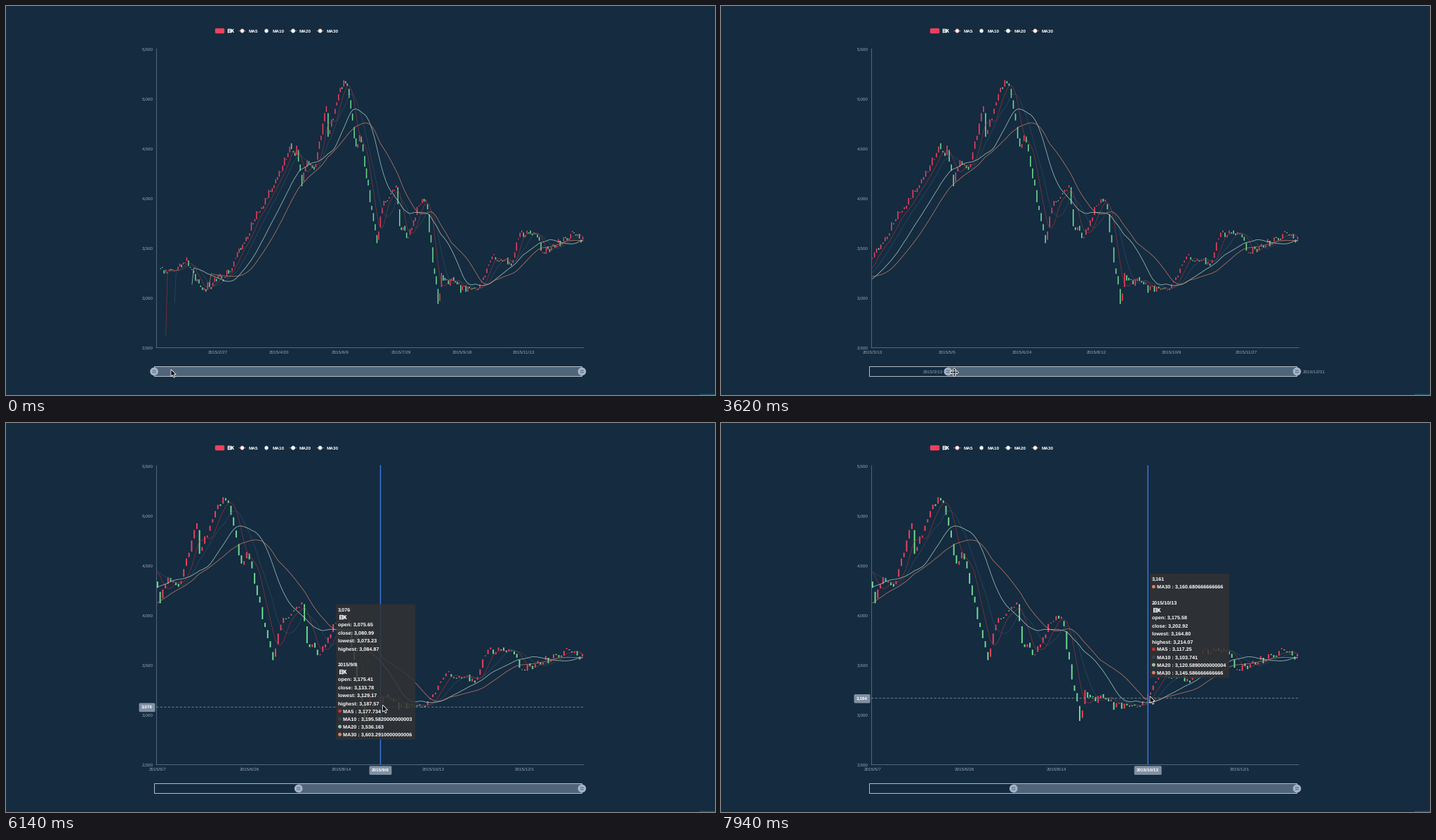
A matplotlib script for the animation above (8 s loop, 1010 px wide and 555 px high).

```python
import numpy as np
import matplotlib.pyplot as plt
from matplotlib.animation import FuncAnimation
from matplotlib.collections import LineCollection
from matplotlib.patches import Circle, FancyBboxPatch, Polygon, Rectangle

W, H, DPI = 1010, 555, 100
PX = 72 / DPI
LOOP, STEP = 8000, 40
LEFT, RIGHT, TOP, BOTTOM = 214, 823, 61, 487
BAR_LEFT, BAR_RIGHT, BAR_Y = 211, 820, 521.5
LABEL_EVERY = 35
ROW = 11.15

BG, MUTED, AXIS = "#142b40", "#9aa8b7", "#5b6e82"
UP, DOWN = "#ee405c", "#6fdc8e"
BADGE, HANDLE = "#8191a4", "#a5b4c6"
AVERAGES = {5: ("#c23531", 0.6), 10: ("#3a5468", 0.6),
            20: ("#b4d6c6", 0.8), 30: ("#d48265", 0.8)}
DOTS = ["#c23531", "#2f4554", "#91c7ae", "#d48265"]

# Main turning points of the price: (trading day, price)
TURNS = [
    (1, 3330), (9, 3240), (17, 3370), (26, 3080), (41, 3260), (52, 3640),
    (70, 4240), (76, 4480), (80, 4470), (83, 4130), (86, 4380), (90, 4290),
    (97, 4930), (98, 4630), (105, 5110), (109, 5160), (114, 4500), (116, 4650),
    (126, 3540), (129, 3930), (137, 4110), (139, 3720), (144, 3630), (149, 3900),
    (154, 3990), (161, 2930), (163, 3190), (183, 3070), (193, 3400), (203, 3330),
    (207, 3640), (219, 3630), (221, 3440), (238, 3640), (244, 3560),
]

# Motion tracks: time followed by the values at that time
HOVER = [(120, 235, 518.5), (680, 211, 523), (1180, 211, 523), (1560, 249, 522),
         (2840, 249, 522), (2960, 225, 519)]
ZOOM = [(2960, 0), (3600, 45), (3760, 45), (4360, 74), (4500, 74), (4640, 82.4)]
POINTER = [(4710, 419, 529), (5280, 496, 413), (5480, 496, 413),
           (6760, 571, 397.5), (7920, 608, 392.7)]
TIP_OFFSET = [(5280, 2, -30), (6760, -113, 105), (7920, 3, -29)]
DRAG_ON, DRAG_OFF, DATES_ON = 2960, 4710, 2000


def track(keys, t):
    times, *values = zip(*keys)
    return [float(np.interp(t, times, v)) for v in values]


def trading_dates():
    breaks = [("2015-01-01", 2), ("2015-02-18", 7), ("2015-04-06", 1),
              ("2015-05-01", 1), ("2015-06-22", 1), ("2015-09-03", 2),
              ("2015-10-01", 7)]
    closed = [np.datetime64(day) + k for day, count in breaks for k in range(count)]
    days = np.arange("2014-12-31", "2016-01-01", dtype="datetime64[D]")
    days = days[np.is_busday(days, holidays=closed)].astype(object)
    return [""] + [f"{d.year}/{d.month}/{d.day}" for d in days[1:]]


def market(count):
    rng = np.random.default_rng(8)
    close = np.interp(np.arange(count), *zip(*TURNS)) + rng.normal(0, 24, count)
    before = np.roll(close, 1)
    opening = before + 0.25 * (close - before) + rng.normal(0, 12, count)
    opening[:2] = 0
    spread = np.abs(rng.normal(0, 22, (2, count)))
    low = np.minimum(opening, close) - spread[0]
    high = np.maximum(opening, close) + spread[1]
    return np.round([opening, close, low, high], 2)


def moving_average(values, n):
    result = np.convolve(values, np.ones(n) / n)[:len(values)]
    result[:n] = np.nan
    return result


def to_y(price):
    return BOTTOM - (np.asarray(price) - 2500) * (BOTTOM - TOP) / 3000


def to_price(y):
    return 2500 + (BOTTOM - y) * 3000 / (BOTTOM - TOP)


def nearest(values, price):
    return int(np.nanargmin(np.abs(values - price)))


DATES = trading_dates()
N = len(DATES)
QUOTES = market(N)
OPEN, CLOSE = QUOTES[:2]
MEANS = {n: moving_average(OPEN, n) for n in AVERAGES}

LATIN, CJK = "Liberation Sans", "Noto Sans CJK JP"
plt.rcParams.update({"font.family": LATIN, "path.snap": False, "text.hinting": "none"})
fig = plt.figure(figsize=(W / 100, H / 100), dpi=DPI, facecolor=BG)
ax = fig.add_axes([0, 0, 1, 1])
ax.set(xlim=(0, W), ylim=(H, 0))
ax.axis("off")


def text(x, y, s="", size=6.4, color=MUTED, **kw):
    kw.setdefault("va", "baseline")
    offset = 0.36 * size if kw["va"] == "baseline" else 0
    return ax.text(x, y + offset, s, fontsize=size * PX, color=color, **kw)


def line(xs, ys, color, width=1.0, **kw):
    return ax.plot(xs, ys, color=color, lw=width * PX, **kw)[0]


def add(patch):
    return ax.add_patch(patch)


def draw_legend():
    add(FancyBboxPatch((299.5, 33.5), 10, 4, boxstyle="round,pad=1.7", fc=UP, ec="none"))
    text(314, 35.5, "日K", color="white", weight="bold", family=CJK)
    edges = ["#e58f8b", "#7f97a8", "#b4d6c6", "#e0a288"]
    for x, n, edge in zip((336.5, 371, 409, 447.5), AVERAGES, edges):
        if n != 10:
            line([x - 4.8, x + 4.8], [35.5, 35.5], edge, 0.8, alpha=0.8)
        add(Circle((x, 35.5), 2.7, fc="white", ec=edge, lw=0.6 * PX, zorder=3))
        text(x + 9, 35.5, f"MA{n}", color="white", weight="bold")


def draw_axes():
    line([LEFT + 0.5] * 2, [TOP, BOTTOM], AXIS, 0.9)
    line([LEFT, RIGHT], [BOTTOM + 0.5] * 2, AXIS, 0.9)
    for price in range(2500, 5501, 500):
        text(210, to_y(price), f"{price:,}", ha="right")


class Handle:
    def __init__(self):
        self.disc = add(Circle((0, BAR_Y), 5.8, fc=HANDLE, ec="none", zorder=7))
        self.bars = [line([], [], "#40566b", 0.9, zorder=8) for _ in range(2)]

    def move(self, x):
        self.disc.center = (x, BAR_Y)
        for bar, dy in zip(self.bars, (-1.4, 1.4)):
            bar.set_data([x - 2.1, x + 2.1], [BAR_Y + dy] * 2)


def cursor_shapes():
    arrow = [(0, 0), (0, 10), (2.3, 7.9), (3.9, 11.6), (5.6, 10.9), (4, 7.3), (7.2, 7.2)]
    arm = np.array([(-.9, -.9), (-.9, -3.3), (-2.4, -3.3), (0, -6), (2.4, -3.3), (.9, -3.3)])
    quarter = np.array([(0, 1), (-1, 0)])
    cross = np.vstack([arm @ np.linalg.matrix_power(quarter, k) for k in range(4)])
    half = np.array([(3, -1), (3, -3), (6, 0), (3, 3), (3, 1)])
    return {"arrow": np.array(arrow), "move": cross, "resize": np.vstack([half, -half])}


def cursor_state(t, zoom):
    if t < DRAG_ON:
        return ("arrow" if t < 1560 else "move"), track(HOVER, t)
    if t < DRAG_OFF:
        kind = "move" if t < 4000 else "resize"
        return kind, [225 + 2.385 * zoom, 519 + 0.08 * zoom]
    x, y = track(POINTER, t)
    return "arrow", [x + 3, y - 3]


draw_legend()
draw_axes()
add(Rectangle((988, 553.6), 22, 1.4, fc="#1d5365", ec="none"))

candles = {color: ax.add_collection(LineCollection([], colors=color, zorder=2))
           for color in (UP, DOWN)}
mean_lines = {n: line([], [], color, 0.85, alpha=alpha, zorder=3)
              for n, (color, alpha) in AVERAGES.items()}
day_labels = [text(0, 494, ha="center") for _ in range(N // LABEL_EVERY)]

selection = add(Rectangle((BAR_LEFT, 514.5), 1, 14, fc="#50657a", ec="none", zorder=4))
add(Rectangle((BAR_LEFT + 0.5, 514.5), BAR_RIGHT - BAR_LEFT, 14, fill=False,
              ec="#c3ccd5", lw=0.9 * PX, zorder=5))
start_handle, end_handle = Handle(), Handle()
end_handle.move(820.5)
start_date = text(0, BAR_Y, ha="right", zorder=7)
end_date = text(828.5, BAR_Y, DATES[-1], zorder=7)

badge = dict(color="white", weight="bold", ha="center", va="center_baseline", zorder=9,
             bbox=dict(boxstyle="round,pad=0.55,rounding_size=0.25", fc=BADGE, ec="none"))
v_line = line([0, 0], [TOP, BOTTOM], "#3a74d8", 1.5, zorder=6)
h_line = line([LEFT, RIGHT], [0, 0], "#8796a6", 0.8, zorder=6, dashes=(4, 3))
x_badge = text(0, 495, **badge)
y_badge = text(201, 0, **badge)
tip_box = add(Rectangle((0, 0), 113, 10, fc="#323232", alpha=0.84, ec="none", zorder=10))
tip_rows = [text(0, 0, size=7.3, color="white", weight="bold", zorder=11) for _ in range(17)]
tip_dots = [add(Circle((0, 0), 2.5, ec="none", zorder=11)) for _ in range(5)]
pointer_parts = [v_line, h_line, x_badge, y_badge, tip_box, *tip_rows, *tip_dots]

SHAPES = cursor_shapes()
cursor = add(Polygon(SHAPES["arrow"], fc="black", ec="white", lw=0.8 * PX, zorder=20))


def draw_market(start):
    width = (RIGHT - LEFT) / (N - start)
    days = np.arange(start, N)
    xs = LEFT + (days - start + 0.5) * width
    y1, y2 = to_y(OPEN[days]), to_y(CLOSE[days])
    top, base = np.minimum(y1, y2), np.maximum(y1, y2)
    base = np.maximum(base, top + 1.2)
    rising = CLOSE[days] >= OPEN[days]
    for color, chosen in ((UP, rising), (DOWN, ~rising)):
        chosen = chosen & (days > 1)
        candles[color].set_segments([[(x, a), (x, b)] for x, a, b in
                                     zip(xs[chosen], top[chosen], base[chosen])])
        candles[color].set_linewidth(max(1.5, 0.52 * width) * PX)
    for n, curve in mean_lines.items():
        curve.set_data(xs, to_y(MEANS[n][days]))
    for k, label in enumerate(day_labels):
        day = start + k * LABEL_EVERY
        label.set_visible(day < N)
        if day < N:
            label.set_text(DATES[day])
            label.set_x(LEFT + (k * LABEL_EVERY + 0.5) * width)
    return width


def quote_rows(day):
    names = ("open", "close", "lowest", "highest")
    return [("日K", None)] + [(f"{n}: {v:,.2f}", None) for n, v in zip(names, QUOTES[:, day])]


def mean_row(k, day):
    n = list(AVERAGES)[k]
    return f"MA{n} : {float(MEANS[n][day]):,}", DOTS[k]


def tooltip_rows(day, price):
    if abs(MEANS[30][day] - price) < 60:
        near = nearest(MEANS[30], price)
        value, rows = MEANS[30][near], [mean_row(3, near)]
    else:
        near = nearest(OPEN, price)
        value, rows = OPEN[near], quote_rows(near)
    rows = [(f"{value:,.0f}", None)] + rows + [("", None), (DATES[day], None)]
    return rows + quote_rows(day) + [mean_row(k, day) for k in range(4)]


def draw_tooltip(x, bottom, rows):
    height = 15 + ROW * (len(rows) - 1)
    y = bottom - height
    tip_box.set_xy((x, y))
    tip_box.set_height(height)
    for unused in tip_rows[len(rows):]:
        unused.set_visible(False)
    dots = iter(tip_dots)
    for k, (item, (words, color)) in enumerate(zip(tip_rows, rows)):
        row_y = y + 7.5 + ROW * k
        item.set_text(words)
        item.set_fontfamily(CJK if words == "日K" else LATIN)
        item.set_position((x + (10 if color else 2.8), row_y + 2.6))
        if color:
            dot = next(dots)
            dot.center = (x + 5.3, row_y)
            dot.set_facecolor(color)
    for unused in dots:
        unused.set_visible(False)


def draw_pointer(t, start, width):
    x, y = track(POINTER, t)
    shown = y <= BOTTOM
    for part in pointer_parts:
        part.set_visible(shown)
    if not shown:
        return
    cell = int((x - LEFT) / width)
    day, price = start + cell, to_price(y)
    center = LEFT + (cell + 0.5) * width
    v_line.set_xdata([center] * 2)
    h_line.set_ydata([y] * 2)
    x_badge.set_text(DATES[day])
    x_badge.set_x(center)
    y_badge.set_text(f"{price:,.0f}")
    y_badge.set_y(y)
    dx, dy = track(TIP_OFFSET, t)
    draw_tooltip(x + dx, y + dy, tooltip_rows(day, price))


def update(frame):
    t = frame * STEP
    zoom, = track(ZOOM, t)
    start = round(zoom)
    width = draw_market(start)

    edge = BAR_LEFT + (BAR_RIGHT - BAR_LEFT) * zoom / (N - 1)
    selection.set_x(edge)
    selection.set_width(BAR_RIGHT - edge)
    start_handle.move(edge)
    start_date.set_text(DATES[start])
    start_date.set_x(edge - 7.5)
    for label in (start_date, end_date):
        label.set_visible(DATES_ON <= t < DRAG_OFF)

    draw_pointer(t, start, width)
    kind, place = cursor_state(t, zoom)
    cursor.set_xy(SHAPES[kind] + place)
    return []


anim = FuncAnimation(fig, update, frames=LOOP // STEP, interval=STEP,
                     init_func=lambda: [], repeat=True, repeat_delay=0, blit=False)
plt.show()
```
